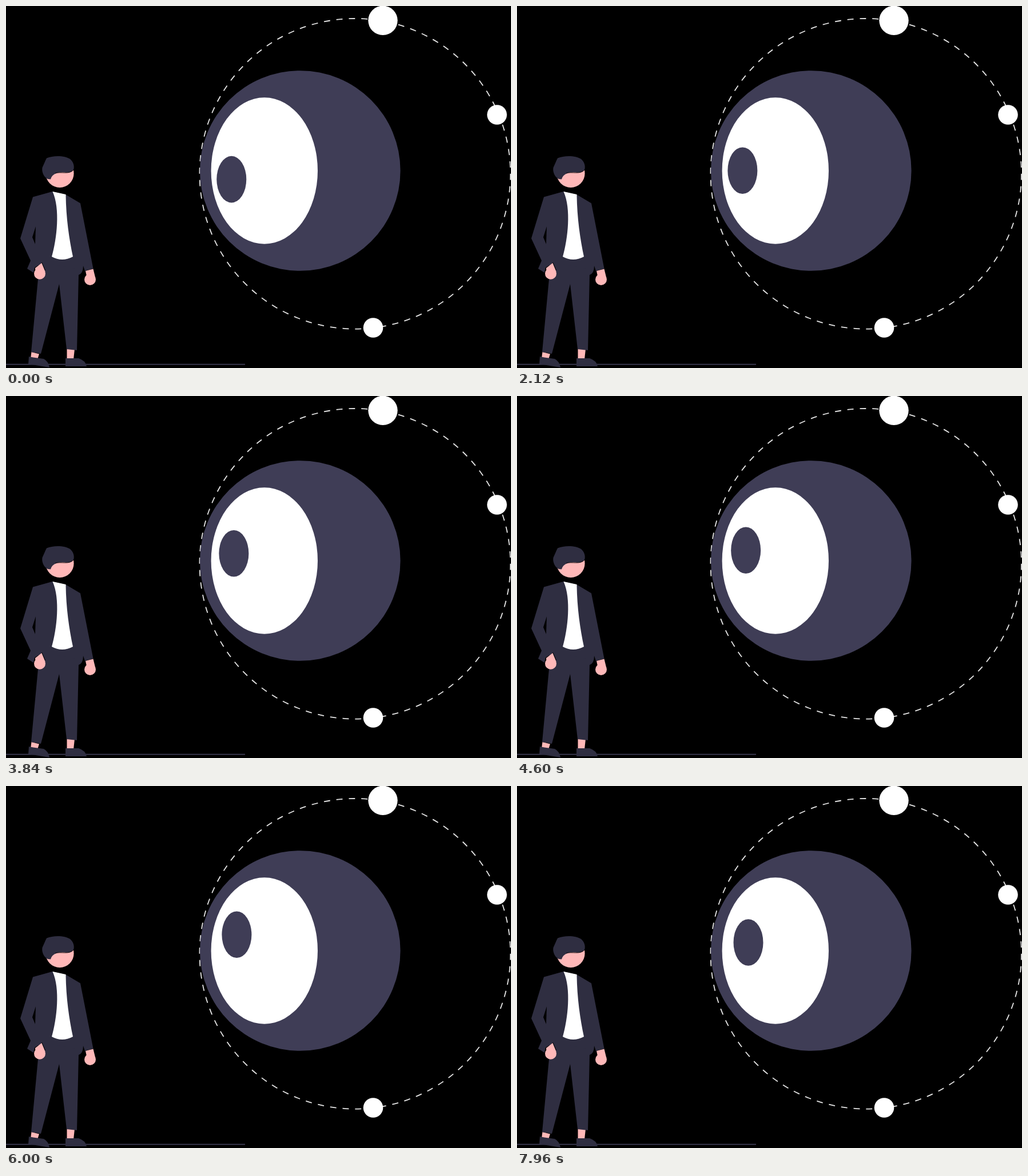
These frames come from a looping animation (883 by 634 pixels, 8 s). An HTML page:

```html
<!DOCTYPE html>
<html lang="en">
<head>
<meta charset="utf-8">
<title>Watching eye</title>
<style>
  html, body { margin: 0; width: 100%; height: 100%; overflow: hidden; background: #000; }
  svg { display: block; width: 100%; height: 100%; }
  .navy { fill: #3f3d56; }
  .suit { fill: #2f2e41; }
  .skin { fill: #ffb8b8; }
  .white { fill: #fff; }
</style>
</head>
<body>
<svg viewBox="0 0 883 634">
  <path d="M0 627.700H418" stroke="#3f3d56" stroke-width="1.8"/>

  <!-- orbit: 78 dashes, each as long as its gap -->
  <circle cx="610.3" cy="293.8" r="271.8" fill="none" stroke="#e6e6e6" stroke-width="1.8" pathLength="156" stroke-dasharray="1"/>
  <g class="white">
    <circle cx="659" cy="25.3" r="25.7"/>
    <circle cx="858.5" cy="190.5" r="17.3"/>
    <circle cx="642" cy="563.5" r="17.3"/>
  </g>

  <!-- eye -->
  <circle class="navy" cx="514.3" cy="288.5" r="175.3"/>
  <ellipse class="white" cx="451.8" cy="288.5" rx="93.2" ry="128.2"/>
  <ellipse class="navy" id="pupil" rx="26" ry="40.8"/>

  <!-- head -->
  <circle class="skin" cx="94" cy="293.3" r="24.6"/>
  <path class="suit" d="M78 303.500L73 303C66 300 62 290 63.500 283C66 278 68 272 71 266.500C83 261 104 262 112 268C118 273 119.500 280 118.500 285C116 291.500 109 292.500 103 291.500C94 290.500 81 292 78 303.500Z"/>
  <path d="M86 293C95 289.500 111 296 118 287" fill="none" stroke="#000" stroke-width=".9"/>

  <!-- legs and feet -->
  <g class="skin">
    <path d="M44.500 606L58 609.500L55 619L43 617Z"/>
    <path d="M106.500 601H120L118 619H106.500Z"/>
  </g>
  <g class="suit">
    <path d="M40 614L48 615.500L66 618Q74 622 76 633L39 627Z"/>
    <path d="M104 617H127Q139 621 141 631H104Z"/>
    <path d="M57 440H128L127 470L124 603L106 601L93 487L61 609L44 606L56 478Z"/>
  </g>

  <!-- jacket, with the gap inside the bent arm -->
  <path class="suit" fill-rule="evenodd" d="M47 334.500L81 325L104 330L130 345.500L152.500 460L138 464L135 455Q135 468 127 471L120 460L64 449L50 458L48 467L37 460L43 446L25 407ZM52 386L46 405L51 417Z"/>
  <path class="white" d="M81.500 325L104.500 330C105 372 110.500 408 117 439Q98 449 80 439C89 408 95 355 81.500 325Z"/>

  <!-- hands -->
  <g class="skin">
    <circle cx="59" cy="468.700" r="10"/>
    <path d="M51 459L62.500 450L68.500 465L52 470Z"/>
    <circle cx="147" cy="479" r="10"/>
    <path d="M139 464L152.500 460.500L156.500 477L141 473Z"/>
  </g>
  <path d="M62.500 449L68.500 463" stroke="#000" stroke-width="1"/>
</svg>
<script>
  const LOOP = 8000;
  const pupil = document.getElementById('pupil');

  // Pupil route: time in ms, x, y; straight runs between the points.
  const route = [
    [0, 394.3, 303.6],
    [1570, 393.05, 292.2],
    [5990, 403.4, 260.2],
    [LOOP, 404.5, 274.3]
  ];

  function pupilAt(time) {
    const i = route.findIndex(point => point[0] > time);
    const [t0, x0, y0] = route[i - 1];
    const [t1, x1, y1] = route[i];
    const k = (time - t0) / (t1 - t0);
    return [x0 + (x1 - x0) * k, y0 + (y1 - y0) * k];
  }

  function draw() {
    const [x, y] = pupilAt(performance.now() % LOOP);
    pupil.setAttribute('cx', x);
    pupil.setAttribute('cy', y);
    requestAnimationFrame(draw);
  }
  draw();
</script>
</body>
</html>
```
